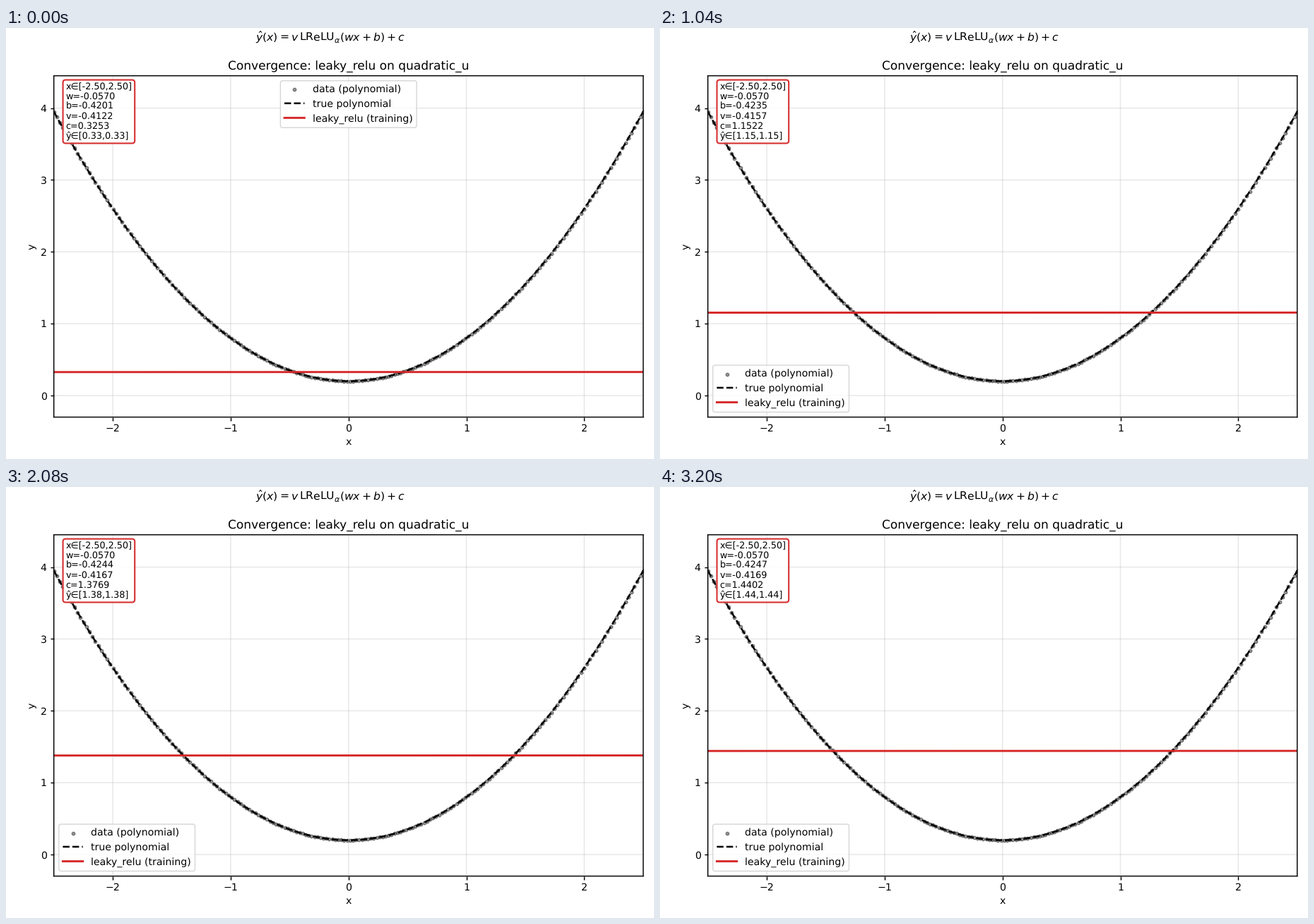
These frames come from a looping animation (917 by 611 pixels, 3.28 s). A matplotlib script:

```python
import matplotlib.pyplot as plt
import numpy as np
from matplotlib.animation import FuncAnimation

W, H = 917, 611
DPI = W / 9
FRAMES, INTERVAL = 41, 80
STEPS_PER_FRAME, LR, ALPHA = 25, 0.002, 0.01
RED = "#d62728"
THIN = 1.03

# Smooth sub-pixel placement of lines and glyphs
plt.rcParams.update({
    "font.family": "DejaVu Sans",
    "text.hinting": "none",
    "path.snap": False,
    "axes.linewidth": THIN,
    "grid.linewidth": THIN,
    "xtick.major.width": THIN,
    "ytick.major.width": THIN,
})

x = np.linspace(-2.5, 2.5, 200)
y = 0.2 + 0.6 * x**2


def predict(w, b, v, c):
    z = w * x + b
    return v * np.where(z > 0, z, ALPHA * z) + c


def train_step(w, b, v, c):
    """One gradient descent step on the mean squared error."""
    z = w * x + b
    slope = np.where(z > 0, 1.0, ALPHA)
    err = 2 * (v * slope * z + c - y)
    return (
        w - LR * np.mean(err * v * slope * x),
        b - LR * np.mean(err * v * slope),
        v - LR * np.mean(err * slope * z),
        c - LR * np.mean(err),
    )


def train():
    params = (-0.0570, -0.42008, -0.41224, 0.3253)
    history = [params]
    for _ in range(FRAMES - 1):
        for _ in range(STEPS_PER_FRAME):
            params = train_step(*params)
        history.append(params)
    return history


history = train()

fig = plt.figure(figsize=(W / DPI, H / DPI), dpi=DPI)
left, right, top, bottom = 67.7, 901.7, 67.7, 551.6
ax = fig.add_axes([left / W, 1 - bottom / H, (right - left) / W, (bottom - top) / H])
fig.suptitle(
    r"$\hat{y}(x)=v\,\mathrm{LReLU}_{\alpha}(wx+b)+c$", fontsize=11, y=0.9965
)
ax.set_title("Convergence: leaky_relu on quadratic_u")
ax.set(xlabel="x", ylabel="y", xlim=(-2.5, 2.5), ylim=(-0.3, 4.45))
ax.set_xticks(range(-2, 3))
ax.set_yticks(range(5))
ax.grid(alpha=0.3)

ax.scatter(x, y, s=10, color="black", alpha=0.4, label="data (polynomial)")
ax.plot(x, y, "k--", lw=1.8, label="true polynomial")
(fit,) = ax.plot(x, predict(*history[0]), color=RED, lw=2.06,
                 label="leaky_relu (training)")
info = ax.text(
    0.02, 0.98, "", transform=ax.transAxes, va="top", ha="left", fontsize=9,
    linespacing=1.126,
    bbox=dict(boxstyle="round,pad=0.3", facecolor="white", edgecolor=RED,
              linewidth=1.5, alpha=0.95),
)
# "best" moves the legend to the lower left once the fit has risen past it
ax.legend(loc="best")


def update(i):
    w, b, v, c = history[i]
    y_hat = predict(w, b, v, c)
    fit.set_ydata(y_hat)
    info.set_text(
        f"x∈[{x[0]:.2f},{x[-1]:.2f}]\n"
        f"w={w:.4f}\nb={b:.4f}\nv={v:.4f}\nc={c:.4f}\n"
        f"ŷ∈[{y_hat.min():.2f},{y_hat.max():.2f}]"
    )
    return fit, info


anim = FuncAnimation(fig, update, frames=FRAMES, interval=INTERVAL, repeat=True)
plt.show()
```
